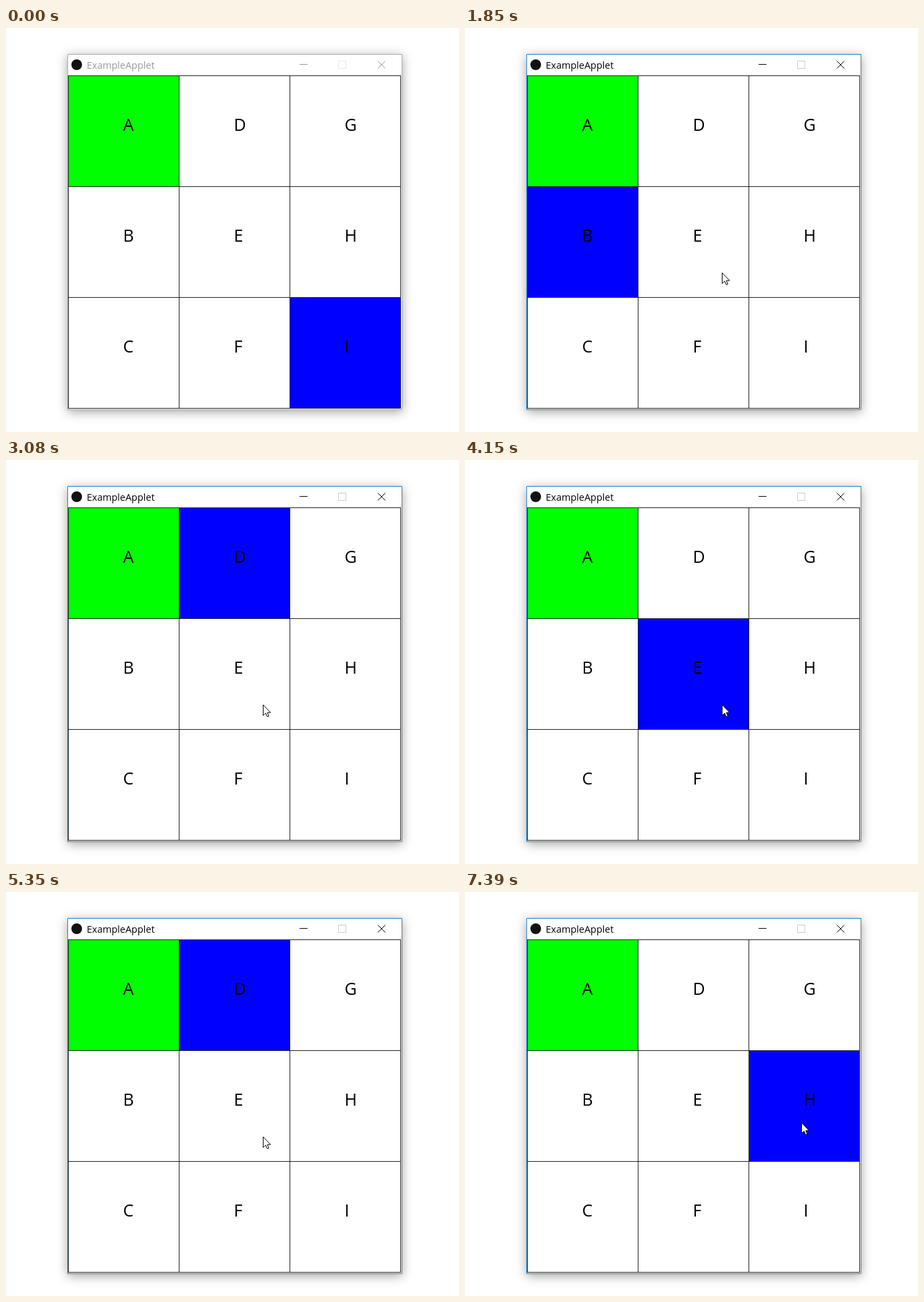
An HTML page for the animation above (8 s loop, 679 px wide and 605 px high).

```html
<!DOCTYPE html>
<html lang="en">
<head>
<meta charset="utf-8">
<title>ExampleApplet</title>
<style>
  html, body { margin: 0; width: 100%; height: 100%; overflow: hidden; background: #fff; }
  #win {
    position: absolute; left: 92px; top: 39px; width: 502px; height: 533px;
    background: #fff; box-shadow: 0 3px 15px rgba(0, 0, 0, .36);
  }
  svg { position: absolute; left: 0; top: 0; display: block; }
  text { font-family: "Open Sans", "Noto Sans", sans-serif; }
  .letter { font-size: 25px; }
  .title { font-size: 14.5px; }
  .line { fill: none; stroke-width: 1; }
</style>
</head>
<body>
<div id="win"></div>
<svg width="679" height="605" viewBox="0 0 679 605">
  <path id="edgeA" class="line" d="M92.5 572V39.5H593"/>
  <path id="edgeB" class="line" d="M593.5 39V571.5H93"/>
  <circle cx="106" cy="55" r="8" fill="#111"/>
  <text id="title" class="title" x="121" y="61">ExampleApplet</text>
  <path id="buttons" class="line" d="M440 54.5h12M557.5 49.5l11 11M568.5 49.5l-11 11"/>
  <rect id="maximize" class="line" x="498.5" y="49.5" width="11" height="11"/>
  <rect x="94" y="72" width="165" height="165" fill="#0f0"/>
  <rect id="mark" width="165" height="165" fill="#00f"/>
  <g id="grid" stroke="#222"></g>
  <g id="letters"></g>
  <path id="cursor" d="M.5 .7V16.6L4.2 13.1 6.6 18.5 9 17.5 6.7 12.2H11.6Z"
        fill="#fff" stroke="#000" stroke-width="1"/>
</svg>
<script>
const LOOP = 8000, CELL = 166, LEFT = 93, TOP = 71, FOCUS = 860;
const NAMES = "ABCDEFGHI";
const $ = id => document.getElementById(id);

// Runs of moves: first time, last time, cells visited at even intervals
const runs = [
  [860, 990, "FE"], [1190, 1720, "CFECFE"], [1850, 1930, "BE"],
  [2060, 2850, "GHIFCBEHE"], [2950, 3080, "GD"], [3180, 3690, "BCFIHE"],
  [3770, 4150, "DHIFE"], [4280, 4560, "GHED"], [4640, 4740, "BE"],
  [4890, 5350, "HIFCBD"], [5450, 5630, "GHE"], [5760, 6140, "CBEBF"],
  [7390, 7390, "H"]
];

const cellX = i => LEFT + CELL * Math.floor(i / 3);
const cellY = i => TOP + CELL * (i % 3);

function add(parent, tag, attrs, text = "") {
  const el = document.createElementNS("http://www.w3.org/2000/svg", tag);
  for (const key in attrs) el.setAttribute(key, attrs[key]);
  el.textContent = text;
  $(parent).appendChild(el);
}

for (let i = 0; i < 4; i++) {
  const x = LEFT + CELL * i + .5, y = TOP + CELL * i + .5;
  add("grid", "path", { d: `M${x} ${TOP}v499M${LEFT} ${y}h499` });
}
[...NAMES].forEach((name, i) =>
  add("letters", "text", { class: "letter", x: cellX(i) + 82.5, y: cellY(i) + 83 }, name));

function markedCell(t) {
  let cell = "I";
  for (const [from, to, path] of runs) {
    if (t < from) break;
    const gap = (to - from) / (path.length - 1) || 1;
    cell = path[Math.min(path.length - 1, Math.floor((t - from) / gap + 1e-6))];
  }
  return NAMES.indexOf(cell);
}

// Index of the current pointer update among n even ones
const stepAt = (t, from, to, n) =>
  Math.min(n - 1, Math.floor((t - from) / (to - from) * (n - 1) + 1e-6));

function cursorAt(t) {
  if (t < 260) return null;
  if (t < 6830) {
    const rest = (1 - stepAt(t, 260, 580, 8) / 7) ** 1.6;
    return [385 + 170 * rest, 366 + 226 * rest];
  }
  const f = (stepAt(t, 6830, 7010, 5) + 1) / 5;
  return [385 + 119 * f, 366 - 56 * f + 35 * f * f];
}

function draw(t) {
  const active = t >= FOCUS;
  $("title").setAttribute("fill", active ? "#000" : "#999");
  $("buttons").setAttribute("stroke", active ? "#000" : "#999");
  $("maximize").setAttribute("stroke", active ? "#ccc" : "#e6e6e6");
  $("edgeA").setAttribute("stroke", active ? "#1883d7" : "#aaa");
  $("edgeB").setAttribute("stroke", active ? "#707070" : "#aaa");

  const cell = markedCell(t);
  $("mark").setAttribute("x", cellX(cell) + 1);
  $("mark").setAttribute("y", cellY(cell) + 1);

  const pos = cursorAt(t);
  $("cursor").setAttribute("visibility", pos ? "visible" : "hidden");
  if (pos) $("cursor").setAttribute("transform", `translate(${pos.map(Math.round)})`);
}

const start = performance.now();
function tick() {
  draw((performance.now() - start) % LOOP);
  requestAnimationFrame(tick);
}
tick();
</script>
</body>
</html>
```
